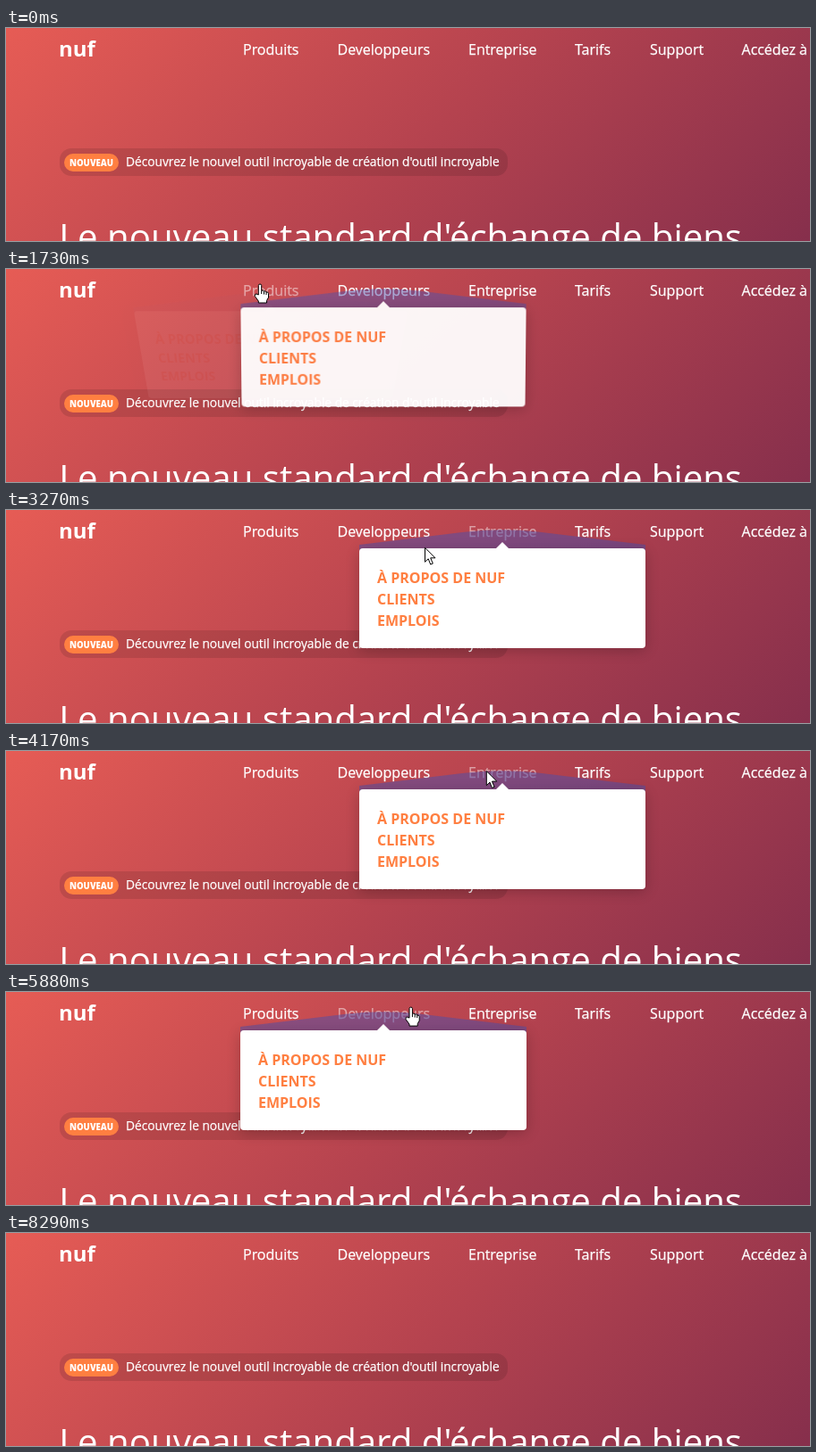
These frames come from a looping animation (899x239 px, 9990 ms). An HTML page:

```html
<!DOCTYPE html>
<html lang="fr">
<head>
<meta charset="utf-8">
<title>Menu</title>
<style>
html, body { margin: 0; width: 100%; height: 100%; overflow: hidden; }
#stage {
  position: relative; width: 899px; height: 239px; overflow: hidden;
  background: linear-gradient(135deg, #e65c55, #b5434f 52%, #862f4c);
  font-family: "Open Sans", sans-serif;
}
svg { position: absolute; left: 0; top: 0; overflow: visible; }
text { fill: #fff; white-space: pre; }
.crisp { stroke: #fff; stroke-width: .25px; }
.popup { position: absolute; top: 43px; width: 320px; height: 112px; opacity: 0; }
.card {
  position: absolute; inset: 0; border-radius: 4px; background: #fff;
  box-shadow: 0 3px 15px rgba(0, 0, 0, .22);
}
.popup text { fill: #ff7f41; font-weight: 700; font-size: 16px; }
.cursor path { fill: #fff; stroke: #000; stroke-linejoin: round; }
</style>
</head>
<body>
<div id="stage">
  <svg width="899" height="239">
    <text x="59" y="32" font-size="24" font-weight="700">nuf</text>
    <g id="nav" class="crisp" font-size="16"></g>
    <rect x="60" y="135" width="501" height="31" rx="13" fill="#000" fill-opacity=".11"/>
    <rect x="65" y="141" width="61" height="20" rx="10" fill="#ff7f41"/>
    <text x="95.5" y="155" font-size="9.6" font-weight="800" text-anchor="middle">NOUVEAU</text>
    <text class="crisp" x="134" y="155" font-size="13.72">Découvrez le nouvel outil incroyable de création d'outil incroyable</text>
    <text x="59.2" y="249" font-size="40.2">Le nouveau standard d'échange de biens</text>
  </svg>
  <div id="popups"></div>
  <svg class="cursor" width="899" height="239">
    <g id="cursor">
      <path id="arrow" d="M.5 .5V16.5L4.2 13 6.7 19.3 9.3 18.2 6.7 12H12Z"/>
      <path id="hand" d="M-1.7 12V1.5Q-1.7 0 0 0T1.7 1.5V7.5Q3.2 6 4.5 8 6 6.8 7 9 9 8.2 9.5 10.5V15L7.5 18.5V21H-1.7V19L-5.7 13.5Q-6 10.5 -4 11Z M1.7 7.5V11M4.5 8V11.5M7 9V12"/>
    </g>
  </svg>
</div>
<script>
const LOOP = 9990, FADE = 250, STEP = 5;
const $ = id => document.getElementById(id);

const links = [['Produits', 265], ['Developpeurs', 370.5], ['Entreprise', 517],
  ['Tarifs', 636], ['Support', 720], ['Accédez à', 822.5]];
$('nav').innerHTML = links.map(([s, x]) => `<text x="${x}" y="30">${s}</text>`).join('');
const navItems = [...$('nav').children];

// Each of the first three links owns a popup centred below it.
const centers = [296, 422, 555];
const entries = ['À PROPOS DE NUF', 'CLIENTS', 'EMPLOIS'];
$('popups').innerHTML = centers.map(c => `
  <div class="popup" style="left:${c - 160}px">
    <svg width="320" height="112">
      <path fill="#5050aa" fill-opacity=".52" d="M0 3V-4L120 -18.5Q160 -23 200 -18.5L320 -4V3Z"/>
    </svg>
    <div class="card"></div>
    <svg width="320" height="112">
      <path fill="#fff" d="M152.5 .5L160 -7 167.5 .5Z"/>
      ${entries.map((s, i) => `<text x="20" y="${39 + 24 * i}">${s}</text>`).join('')}
    </svg>
  </div>`).join('');
const popups = [...document.querySelectorAll('.popup')];

const spots = {
  below: [640, 204], ent: [537, 22], prodEdge: [329, 17], prod: [284, 17],
  left: [425, 66], slope: [468, 42], devEdge: [470, 17], dev: [451, 17],
  gap: [487, 28], right: [596, 27], card: [694, 115], exit: [779, 200]
};

// [start, end, destination]; the cursor rests between moves
const moves = [
  [70, 70, 'below'], [70, 760, 'ent'], [1100, 1690, 'prodEdge'], [1690, 1730, 'prod'],
  [1960, 2130, 'ent'], [2540, 3010, 'left'], [3160, 3270, 'slope'],
  [3270, 3400, 'devEdge'], [3400, 3600, 'dev'], [3700, 3850, 'ent'],
  [4170, 4710, 'left'], [4890, 5300, 'dev'], [5880, 5930, 'ent'],
  [6330, 6480, 'gap'], [6480, 6760, 'left'], [7120, 7300, 'right'],
  [7530, 7760, 'card'], [7940, 8290, 'exit']
];

function cursorAt(t) {
  const i = moves.findLastIndex(m => m[0] <= t);
  if (i < 1 || t >= moves.at(-1)[1]) return null;
  const [start, end, to] = moves[i];
  const a = spots[moves[i - 1][2]], b = spots[to];
  const p = Math.min(1, (t - start) / (end - start));
  return a.map((v, k) => v + (b[k] - v) * p);
}

// Inside the card or the sloped bridge above it
function covers(id, [x, y]) {
  const dx = Math.abs(x - centers[id]);
  return dx < 160 && y < 155 && y > 39 - 21 * (1 - dx / 160);
}

function linkAt([x, y], open) {
  if (y > 34 || open >= 0 && covers(open, [x, y])) return -1;
  return centers.findIndex((_, i) =>
    x >= links[i][1] && x <= links[i][1] + navItems[i].getComputedTextLength());
}

function nextOpen(pos, open) {
  const link = linkAt(pos, open);
  if (link >= 0) return link;
  return open >= 0 && (pos[1] < 43 || covers(open, pos)) ? open : -1;
}

// Walk the loop once to find when each popup opens: [time, popup]
const hovers = [[0, -1]];
for (let t = 0; t < LOOP; t += STEP) {
  const pos = cursorAt(t), open = hovers.at(-1)[1];
  const next = pos ? nextOpen(pos, open) : -1;
  if (next !== open) hovers.push([t, next]);
}

const ramp = ms => {
  const p = Math.min(1, Math.max(0, ms / FADE));
  return p * p * (3 - 2 * p);
};

function popupLevel(id, t) {
  return hovers.reduce((sum, [start, open], i) => open !== id ? sum
    : sum + ramp(t - start) - ramp(t - hovers[i + 1][0]), 0);
}

function draw(t) {
  const open = hovers.findLast(h => h[0] <= t)[1];
  popups.forEach((el, id) => {
    const v = popupLevel(id, t), rest = 1 - v;
    el.style.opacity = v;
    el.style.transform = rest > 0
      ? `perspective(250px) scale(${1 - .105 * rest}) rotateX(${-16 * rest}deg)` : 'none';
    navItems[id].style.opacity = id === open ? .5 : 1;
  });
  const pos = cursorAt(t);
  $('cursor').style.display = pos ? '' : 'none';
  if (!pos) return;
  const onLink = linkAt(pos, open) >= 0;
  $('hand').style.display = onLink ? '' : 'none';
  $('arrow').style.display = onLink ? 'none' : '';
  $('cursor').setAttribute('transform', `translate(${pos})`);
}

const begin = performance.now();
function tick() {
  draw((performance.now() - begin) % LOOP);
  requestAnimationFrame(tick);
}
draw(0);
requestAnimationFrame(tick);
</script>
</body>
</html>
```
